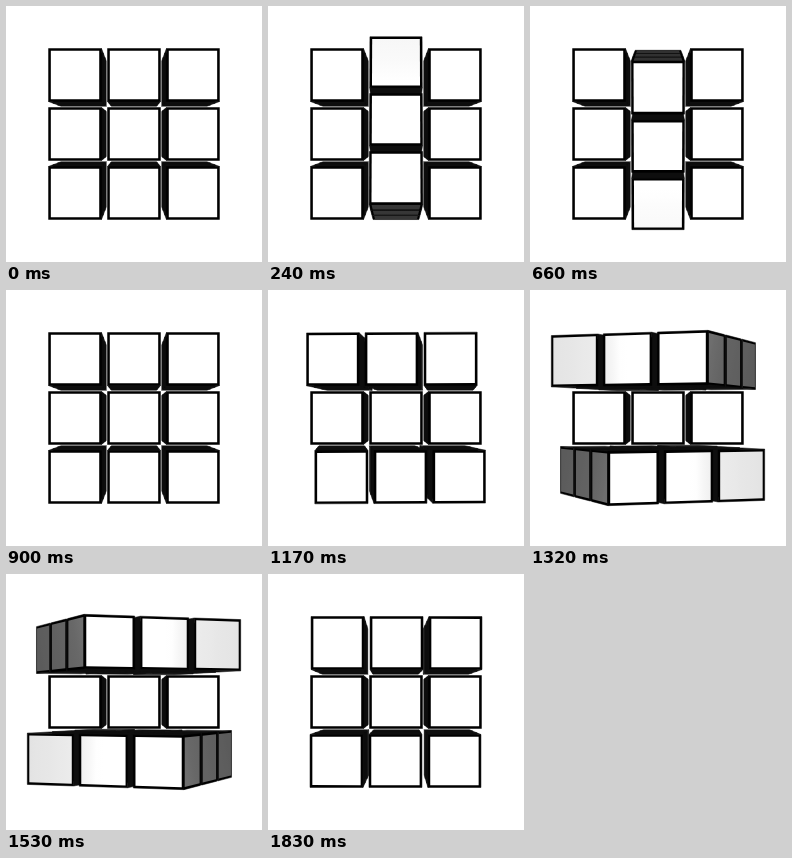
An HTML page with a canvas that plays this animation: 256x256 px, repeating every 1860 ms.

```html
<!DOCTYPE html>
<html lang="en">
<head>
<meta charset="utf-8">
<title>Turning cube</title>
<style>
  html, body { margin: 0; width: 100%; height: 100%; overflow: hidden; background: #fff; }
  canvas { display: block; width: 256px; height: 256px; }
</style>
</head>
<body>
<canvas id="stage"></canvas>
<script>
const LOOP = 1860, STEP = 30, TURN = 840;
const COLUMN_START = 60, ROWS_START = 1050;
const SPACING = 59, HALF = 26.5, STICKER = 24.2;
const FRONT = 86, FOCAL = 1000, EYE = FRONT + FOCAL, LAMP = 600;

const canvas = document.getElementById('stage');
const ratio = window.devicePixelRatio || 1;
canvas.width = canvas.height = 256 * ratio;
const ctx = canvas.getContext('2d');
ctx.scale(ratio, ratio);
ctx.lineJoin = 'round';

// Timing curve through (0,0), (x1,0), (x2,1), (1,1)
function ease(x, x1, x2) {
  if (x <= 0) return 0;
  if (x >= 1) return 1;
  let lo = 0, hi = 1, s = 0.5;
  for (let i = 0; i < 30; i++) {
    s = (lo + hi) / 2;
    const at = 3 * (1 - s) * (1 - s) * s * x1 + 3 * (1 - s) * s * s * x2 + s * s * s;
    if (at < x) lo = s; else hi = s;
  }
  return s * s * (3 - 2 * s);
}

// Positive angles carry the front up (axis 0) or left (axis 1)
function rotate(p, axis, angle) {
  const c = Math.cos(angle), s = Math.sin(angle), m = 1 - axis;
  const q = p.slice();
  q[m] = p[m] * c - p[2] * s;
  q[2] = p[2] * c + p[m] * s;
  return q;
}

function project(p) {
  const k = FOCAL / (EYE - p[2]);
  return [128 + p[0] * k, 128 + p[1] * k];
}

function grey(v) {
  const g = Math.round(255 * Math.min(1, Math.max(0, v)));
  return `rgb(${g},${g},${g})`;
}

// Nearby lamp plus a soft highlight on the centre line
function shade(p, n, m) {
  const dz = LAMP - p[2];
  const cos = (dz * n[2] - p[m] * n[m]) / Math.hypot(dz, p[m]);
  return 0.19 + 0.83 * Math.max(0, cos) + 0.3 * Math.exp(-((p[m] / 30) ** 2));
}

function fillPath(points, fill, outline) {
  ctx.beginPath();
  for (const p of points) ctx.lineTo(...project(p));
  ctx.closePath();
  ctx.fillStyle = fill;
  ctx.fill();
  if (outline) {
    ctx.strokeStyle = fill;
    ctx.lineWidth = 0.5;
    ctx.stroke();
  }
}

function drawFace(cell, a, dir, axis, angle) {
  const b = (a + 1) % 3, e = (a + 2) % 3;
  const point = (u, v) => {
    const p = cell.map(i => i * SPACING);
    p[a] += dir * HALF;
    p[b] += u;
    p[e] += v;
    return rotate(p, axis, angle);
  };
  const square = r => [point(-r, -r), point(r, -r), point(r, r), point(-r, r)];
  const normal = [0, 0, 0];
  normal[a] = dir;
  const n = rotate(normal, axis, angle);
  const mid = point(0, 0);
  const facing = n[2] * (EYE - mid[2]) - n[0] * mid[0] - n[1] * mid[1];
  if (facing <= 0) return;

  const outer = cell[a] === dir;
  fillPath(square(HALF), outer ? '#000' : '#0e0e0e', true);
  if (!outer || a === axis) return;

  const along = t => b === axis ? point(0, t) : point(t, 0);
  const from = project(along(-STICKER)), to = project(along(STICKER));
  const paint = ctx.createLinearGradient(...from, ...to);
  for (let i = 0; i <= 6; i++) {
    const p = along(STICKER * (i / 3 - 1));
    paint.addColorStop(i / 6, grey(shade(p, n, 1 - axis)));
  }
  fillPath(square(STICKER), paint, false);
}

function drawSlab(layer, axis, angle) {
  const cubes = [];
  for (let i = -1; i <= 1; i++) {
    for (let z = -1; z <= 1; z++) {
      const cell = axis === 0 ? [layer, i, z] : [i, layer, z];
      const c = rotate(cell.map(v => v * SPACING), axis, angle);
      cubes.push({ cell, far: Math.hypot(c[0], c[1], EYE - c[2]) });
    }
  }
  cubes.sort((p, q) => q.far - p.far);
  for (const { cell } of cubes) {
    for (let a = 0; a < 3; a++) {
      drawFace(cell, a, -1, axis, angle);
      drawFace(cell, a, 1, axis, angle);
    }
  }
}

function draw(t) {
  const quarter = Math.PI / 2;
  ctx.fillStyle = '#fff';
  ctx.fillRect(0, 0, 256, 256);
  if (t < 990) {
    const angle = quarter * ease((t - COLUMN_START) / TURN, 0.43, 0.38);
    drawSlab(-1, 0, 0);
    drawSlab(1, 0, 0);
    drawSlab(0, 0, angle);
  } else {
    const angle = quarter * ease((t - ROWS_START) / TURN, 0.5, 0.335);
    drawSlab(-1, 1, angle);
    drawSlab(1, 1, -angle);
    drawSlab(0, 1, 0);
  }
}

const begin = performance.now();
function tick() {
  const t = (performance.now() - begin) % LOOP;
  draw(Math.floor(t / STEP) * STEP);
  requestAnimationFrame(tick);
}
tick();
</script>
</body>
</html>
```
